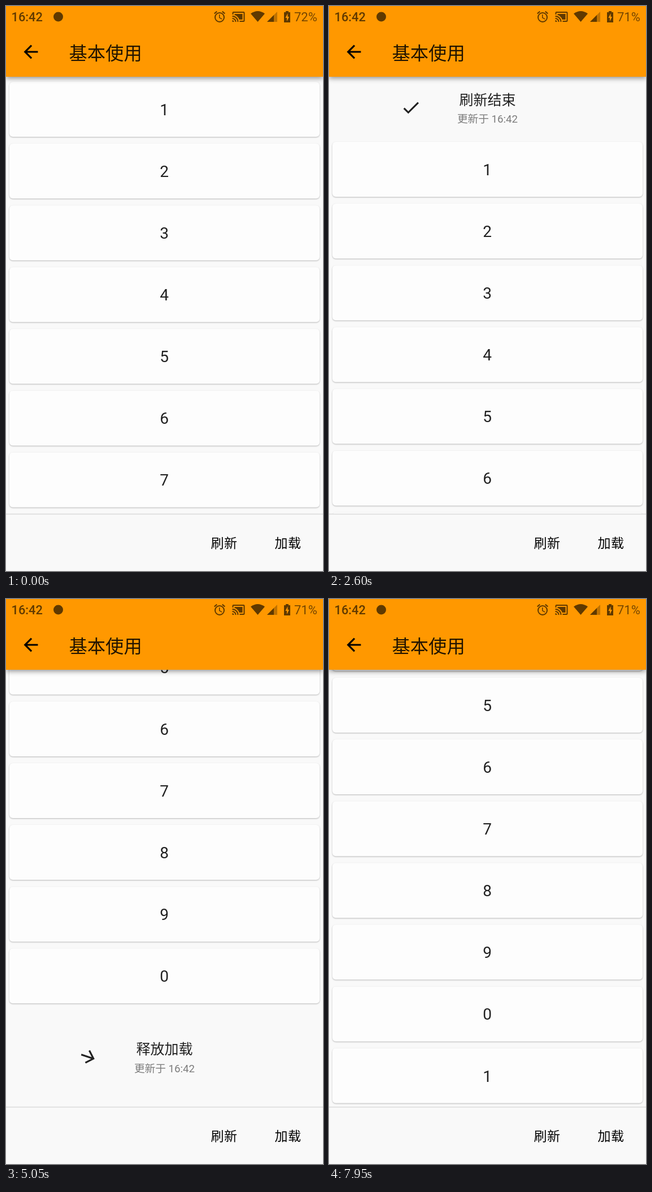
Animation, 561 px wide and 998 px high, one loop 8000 ms. Source, as an HTML page:

```html
<!DOCTYPE html>
<html lang="zh-CN">
<head>
<meta charset="utf-8">
<style>
html, body { margin: 0; height: 100%; overflow: hidden; background: #f9f9f9; }
svg { display: block; width: 100vw; height: 100vh; font-family: Roboto, "Noto Sans CJK SC", "Noto Sans CJK", sans-serif; }
.bar { fill: #ff9800; filter: drop-shadow(0 3px 4px #0006); }
.card rect { fill: #fdfdfd; filter: drop-shadow(0 1.5px 1px #0004); }
.mid { text-anchor: middle; }
.card text { font-size: 28px; fill: #212121; }
.title { font-size: 25px; fill: #212121; }
.note { font-size: 18.7px; fill: #7c7c7c; }
.status { fill: #5f3900; }
.btn { font-size: 23px; letter-spacing: .4px; }
</style>
</head>
<body>
<svg viewBox="0 0 561 998">
  <defs>
    <clipPath id="view"><rect y="125" width="561" height="772"/></clipPath>
  </defs>
  <rect width="561" height="998" fill="#f9f9f9"/>
  <g clip-path="url(#view)">
    <g id="list"></g>
    <g id="header"></g>
    <g id="footer"></g>
  </g>
  <path d="M0 897.5H561" stroke="#d9d9d9" stroke-width="1.5"/>
  <text class="btn mid" x="386" y="957">刷新</text>
  <text class="btn mid" x="499" y="957">加载</text>

  <rect class="bar" y="-10" width="561" height="135"/>
  <path transform="translate(25.3 62.3) scale(1.558)" d="M20 11H7.83l5.59-5.59L12 4l-8 8 8 8 1.41-1.41L7.83 13H20z"/>
  <text x="111.500" y="95" font-size="32.3" fill="#211400">基本使用</text>

  <g class="status">
    <text x="9.5" y="27" font-size="21.8" font-weight="500">16:42</text>
    <circle cx="92.5" cy="19" r="8.5"/>
    <path transform="translate(366 7)" d="M22 5.72l-4.6-3.86-1.29 1.53 4.6 3.86zM7.88 3.39L6.6 1.86 2 5.71l1.29 1.53zM12.5 8H11v6l4.75 2.85.75-1.23-4-2.37zM12 4a9 9 0 0 0 0 18 9 9 0 0 0 0-18zm0 16a7 7 0 0 1 0-14 7 7 0 0 1 0 14z"/>
    <path transform="translate(399.5 7)" d="M1 18v3h3c0-1.66-1.34-3-3-3zm0-4v2c2.76 0 5 2.24 5 5h2c0-3.87-3.13-7-7-7zm18-7H5v1.63c3.96 1.28 7.09 4.41 8.37 8.37H19zM1 10v2a9 9 0 0 1 9 9h2c0-6.08-4.93-11-11-11zm20-7H3c-1.1 0-2 .9-2 2v3h2V5h18v14h-7v2h7c1.1 0 2-.9 2-2V5c0-1.1-.9-2-2-2z"/>
    <path d="M433 13.5Q445.500 4.500 458 13.500L445.500 28z"/>
    <path d="M462 28L480 10V28z" opacity=".4"/>
    <path d="M462 28L474 16V28z"/>
    <path d="M495 9h5v2h3v18h-11V11h3z"/>
    <path d="M498.500 13l-4 8h2.500v6l4-8h-2.500z" fill="#ff9800"/>
    <text id="charge" x="510" y="27" font-size="22" fill="#754600"></text>
  </g>
</svg>
<script>
const LOOP = 8000, TOP = 125, PITCH = 109.08, TRIGGER = PITCH;
const $ = id => document.getElementById(id);

const linear = u => u;
const easeOut = u => 1 - (1 - u) ** 2;
const cubicOut = u => 1 - (1 - u) ** 3;

// [time, list offset, easing of the move leading there]
const path = [
  [0, 3], [700, 150, easeOut], [900, 150], [1080, 109, easeOut],
  [3250, 109], [3600, 0, cubicOut], [3700, 0], [3950, -130.3, linear],
  [4550, -319, easeOut], [4700, -319], [5050, -495.5, linear],
  [5220, -530, easeOut], [5250, -530], [5960, -428.3, cubicOut], [LOOP, -428.3]
];

function offsetAt(t) {
  const i = path.findIndex(k => k[0] > t);
  const [t0, a] = path[i - 1], [t1, b, ease = linear] = path[i];
  return a + (b - a) * ease((t - t0) / (t1 - t0));
}

const DOWN = "M20 12l-1.41-1.41L13 16.17V4h-2v12.17l-5.58-5.59L4 12l8 8z";
const CHECK = "M9 16.17L4.83 12l-1.42 1.41L9 19 21 7l-1.41-1.41z";

const phases = {
  header: { armed: 330, busy: 1050, done: 2550, turn: 0, words: ["拉动刷新", "释放刷新", "正在刷新...", "刷新结束"] },
  footer: { armed: 4930, busy: 5300, done: 7250, turn: 180, words: ["推动加载", "释放加载", "正在加载", "加载结束"] }
};

for (let i = 0; i < 20; i++) {
  $("list").innerHTML += `<g class="card" transform="translate(0 ${i * PITCH})">
    <rect x="6" y="-49" width="549" height="97" rx="6"/>
    <text class="mid" x="280" y="10">${(i + 1) % 10}</text></g>`;
}
for (const id in phases) {
  $(id).innerHTML = `<path class="icon" fill="#212121"/>
    <path class="ring" fill="none" stroke="#212121" stroke-width="3.6"/>
    <text class="title mid" x="280.500" y="-4.500"></text>
    <text class="note mid" x="280.500" y="27">更新于 16:42</text>`;
}

// Standard material curve, cubic-bezier(.4, 0, .2, 1)
function material(x) {
  x = Math.min(1, Math.max(0, x));
  let lo = 0, hi = 1, s;
  for (let i = 0; i < 20; i++) {
    s = (lo + hi) / 2;
    const bx = 1.2 * s * (1 - s) ** 2 + .6 * s * s * (1 - s) + s ** 3;
    if (bx < x) lo = s; else hi = s;
  }
  return s * s * (3 - 2 * s);
}

function ringPath(ms) {
  const turns = ms / 1333, step = Math.floor(turns), u = turns - step;
  const head = material(u * 2), tail = material(u * 2 - 1);
  const start = Math.PI * (-.5 + tail * 1.5 + u * 1.7 - step * .8);
  const end = start + Math.max(.2, (head - tail) * 1.5 * Math.PI);
  const point = a => `${148 + 15.5 * Math.cos(a)} ${15.5 * Math.sin(a)}`;
  return `M${point(start)}A15.5 15.5 0 ${end - start > Math.PI ? 1 : 0} 1 ${point(end)}`;
}

function drawIndicator(id, t, y) {
  const p = phases[id], g = $(id);
  const state = (t >= p.armed) + (t >= p.busy) + (t >= p.done);
  const icon = g.querySelector(".icon"), ring = g.querySelector(".ring");
  const angle = state < 2 ? p.turn + 180 * Math.min(1, Math.max(0, (t - p.armed) / 200)) : 0;
  g.setAttribute("transform", `translate(0 ${y})`);
  g.querySelector(".title").textContent = p.words[state];
  icon.setAttribute("d", state === 2 ? "" : state === 3 ? CHECK : DOWN);
  icon.setAttribute("transform", `translate(145 0) rotate(${angle}) scale(1.558) translate(-12 -12)`);
  // The spinner stalls briefly before loading ends
  const spin = t > 6900 && t < 7200 ? 6900 : t;
  ring.setAttribute("d", state === 2 ? ringPath(spin - p.busy) : "");
}

function draw(t) {
  const off = offsetAt(t), more = t >= 7550;
  $("list").setAttribute("transform", `translate(0 ${180 + off})`);
  [...$("list").children].forEach((card, i) => card.style.display = i < 10 || more ? "" : "none");

  drawIndicator("header", t, TOP + off - Math.max(TRIGGER, off) / 2);
  const end = TOP + off + 10 * PITCH;
  drawIndicator("footer", t, end + Math.max(TRIGGER, 897 - end) / 2);
  $("footer").style.display = more ? "none" : "";
  $("charge").textContent = t < 1750 ? "72%" : "71%";
}

const begin = performance.now();
function tick() {
  const t = Math.max(0, performance.now() - begin) % LOOP;
  draw(Math.floor(t / 50) * 50);
  requestAnimationFrame(tick);
}
tick();
</script>
</body>
</html>
```
